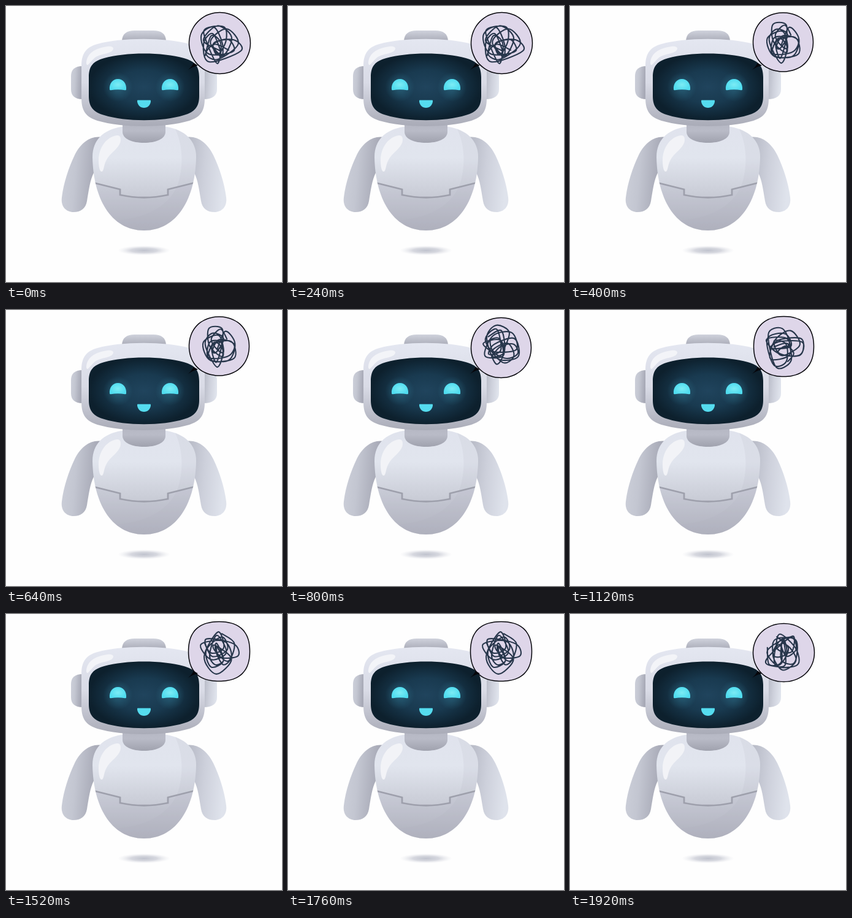
These frames come from a looping animation (450 by 450 pixels, 2240 ms). An HTML page:

```html
<!DOCTYPE html>
<html lang="en">
<head>
<meta charset="utf-8">
<title>Thinking robot</title>
<style>
  html, body { margin: 0; width: 100%; height: 100%; overflow: hidden; background: #fefefe; }
  svg { display: block; width: 100%; height: 100%; }
  .thought { visibility: hidden; animation: long 2240ms step-end infinite; animation-delay: calc(var(--at) * 1ms - 2240ms); }
  .thought.brief { animation-name: brief; }
  .outline { fill: #ded6e9; stroke: #05050a; stroke-width: 1.5; }
  .tail { fill: #05050a; }
  .scribble { fill: none; stroke: #27364b; stroke-width: 2.1; stroke-linecap: round; }
  @keyframes long { 0% { visibility: visible; } 17.8571%, 100% { visibility: hidden; } }
  @keyframes brief { 0% { visibility: visible; } 14.2857%, 100% { visibility: hidden; } }
</style>
</head>
<body>
<svg viewBox="0 0 450 450">
  <defs>
    <linearGradient id="shell" x2="0" y2="1">
      <stop offset="0" stop-color="#e4e7f1"/><stop offset=".5" stop-color="#d9dbe6"/><stop offset="1" stop-color="#a9abb7"/>
    </linearGradient>
    <linearGradient id="torso" x2="0" y2="1">
      <stop offset="0" stop-color="#e0e3ed"/><stop offset=".3" stop-color="#e1e5ee"/><stop offset=".6" stop-color="#cdd0da"/><stop offset="1" stop-color="#b2b4bf"/>
    </linearGradient>
    <linearGradient id="knob" x2="0" y2="1">
      <stop offset="0" stop-color="#cfd2dc"/><stop offset="1" stop-color="#a8aab6"/>
    </linearGradient>
    <linearGradient id="neck" x2="0" y2="1">
      <stop offset="0" stop-color="#b5b7c3"/><stop offset=".4" stop-color="#b9bbc7"/><stop offset="1" stop-color="#a0a2ae"/>
    </linearGradient>
    <linearGradient id="leftSide" x2="1" y2=".15">
      <stop offset="0" stop-color="#cdd0da"/><stop offset=".4" stop-color="#c3c6d1"/><stop offset=".9" stop-color="#a7a9b6"/>
    </linearGradient>
    <linearGradient id="rightSide" x2="1" y2=".15">
      <stop offset="0" stop-color="#b4b7c3"/><stop offset=".5" stop-color="#cdd0db"/><stop offset="1" stop-color="#dfe3ec"/>
    </linearGradient>
    <radialGradient id="screen">
      <stop offset="0" stop-color="#20445d"/><stop offset=".5" stop-color="#193a50"/><stop offset="1" stop-color="#0d202d"/>
    </radialGradient>
    <radialGradient id="glow">
      <stop offset="0" stop-color="#3a91ad" stop-opacity=".4"/><stop offset="1" stop-color="#3a91ad" stop-opacity="0"/>
    </radialGradient>
    <radialGradient id="light">
      <stop offset="0" stop-color="#7cecf5"/><stop offset="1" stop-color="#50dcef"/>
    </radialGradient>
    <radialGradient id="shadow">
      <stop offset="0" stop-color="#bfc2cd"/><stop offset=".5" stop-color="#ccced7" stop-opacity=".8"/><stop offset="1" stop-color="#e6e7ed" stop-opacity="0"/>
    </radialGradient>
    <clipPath id="inTorso"><use href="#torsoShape"/></clipPath>
    <g id="eye">
      <circle r="24" fill="url(#glow)"/>
      <path d="M-13.5 4C-14.5-6-8-13 0-13S14.5-6 13.5 4Q13.5 5.5 11.5 5.300Q0 3-11.5 5.300Q-13.5 5.5-13.5 4Z" fill="url(#light)"/>
    </g>
  </defs>

  <ellipse cx="225" cy="398.500" rx="43" ry="8" fill="url(#shadow)"/>

  <path d="M156 214C138 211 122 223 112 243C102 264 94 288 91 312C89 327 98 336 110 336C122 336 130 330 132 318C135 300 137 284 143 272Z" fill="url(#leftSide)"/>
  <path d="M294 214C312 211 328 223 338 243C348 264 356 288 359 312C361 327 352 336 340 336C328 336 320 330 318 318C315 300 313 284 307 272Z" fill="url(#rightSide)"/>

  <path id="torsoShape" d="M188 197C158 202 141 219 141 246C142 312 170 366 225 366S309 312 310 246C310 219 291 202 262 197Z" fill="url(#torso)"/>
  <g clip-path="url(#inTorso)">
    <path d="M273 195C286 218 290 249 283 281C275 319 237 345 180 350V370H315V195Z" fill="#a6a9b8" opacity=".13"/>
    <path d="M140 288L186 299V308Q225 316.500 264 308V299L310 288V370H140Z" fill="#a2a4b2" opacity=".16"/>
    <path d="M144 288.500L186 299V308Q225 316.500 264 308V299L306 288.500" fill="none" stroke="#9ea0ac" stroke-width="2.800"/>
  </g>
  <path d="M180 211C164 214 151 230 151 252C151 263 153 270 156 270C160 270 159 258 165 249C172 238 187 230 187 218C187 212 184 210.500 180 211Z" fill="#f2f3f7"/>
  <path d="M190 190H260V205C260 217 244 223 225 223S190 217 190 205Z" fill="url(#neck)"/>

  <path d="M125 98C112 98 106 104 106 114V136C106 146 112 152 125 152Z" fill="url(#leftSide)"/>
  <path d="M322 98C337 98 344 104 344 114V136C344 146 337 152 322 152Z" fill="url(#rightSide)"/>
  <path d="M189 58C189 45 197 40 210 40H240C253 40 261 45 261 58Z" fill="url(#knob)"/>
  <path d="M123 98C123 77 131 67 149 62C187 51 261 51 299 62C317 67 324 77 324 98V150C324 172 317 181 299 187C259 199 190 199 149 187C131 181 123 172 123 150Z" fill="url(#shell)"/>
  <path d="M131 94C131 79 143 69 165 66C173 65 177 68 174 72C169 79 152 77 143 86C137 92 134 97 132 96Z" fill="#f3f4f8"/>
  <path d="M135 116C135 98 142 90 160 85C195 75 255 75 290 85C308 90 315 98 315 116V147C315 164 308 173 290 178C255 189 195 189 160 178C142 173 135 164 135 147Z" fill="url(#screen)"/>
  <use href="#eye" x="182.500" y="132"/>
  <use href="#eye" x="267.500" y="132"/>
  <path d="M214.500 153.500H235.500Q236.300 153.500 236 156C235 162 231 166 225 166S215 162 214 156Q213.700 153.500 214.500 153.500Z" fill="#55dcef"/>
</svg>
<script>
  // Each thought is a bubble around (x, y); corner pushes its diagonals outwards.
  const thoughts = [
    { at: 0, x: 348.5, y: 60.5, rx: 50, ry: 50, corner: 0 },
    { at: 400, x: 347.5, y: 59, rx: 49, ry: 48, corner: 0.02 },
    { at: 800, x: 347.5, y: 61.5, rx: 49, ry: 49, corner: 0.01, brief: true },
    { at: 1120, x: 348.5, y: 59.5, rx: 49, ry: 49, corner: 0.05 },
    { at: 1520, x: 347.5, y: 61, rx: 50, ry: 48.5, corner: 0.06 },
    { at: 1920, x: 348.5, y: 63, rx: 50, ry: 47.5, corner: 0.01, brief: true }
  ];
  const svg = document.querySelector('svg');

  function add(parent, tag, attributes) {
    const node = document.createElementNS(svg.namespaceURI, tag);
    for (const [name, value] of Object.entries(attributes)) node.setAttribute(name, value);
    return parent.appendChild(node);
  }

  function seededRandom(seed) {
    return () => {
      seed = (seed * 16807) % 2147483647;
      return seed / 2147483647;
    };
  }

  // Smooth curve through all points (Catmull-Rom as cubic Beziers).
  function smooth(points) {
    const at = i => points[Math.max(0, Math.min(points.length - 1, i))];
    const handle = (i, dir) => at(i).map((v, k) => v + dir * (at(i + 1)[k] - at(i - 1)[k]) / 6);
    return points.slice(1).reduce(
      (d, point, i) => d + 'C' + [handle(i, 1), handle(i + 1, -1), point].join(' '), 'M' + points[0]);
  }

  function outline({ x, y, rx, ry, corner }) {
    const points = Array.from({ length: 49 }, (_, i) => {
      const angle = i * Math.PI / 24;
      const reach = 1 + corner * (1 - Math.cos(4 * angle)) / 2;
      return [x + rx * reach * Math.cos(angle), y + ry * reach * Math.sin(angle)];
    });
    return smooth(points) + 'Z';
  }

  // Loops of changing size around a centre that wanders inside the bubble.
  function scribble({ x, y }, random) {
    const points = [];
    let angle = random() * 2 * Math.PI;
    let drift = random() * 2 * Math.PI;
    for (let loop = 0; loop < 9; loop++) {
      const offset = 8 + 8 * random();
      const [width, height] = [12 + 13 * random(), 12 + 13 * random()];
      drift += 1.8 + random();
      for (let step = 0; step < 4; step++) {
        angle += 1.3 + 0.5 * random();
        points.push([
          x - 1 + offset * Math.cos(drift) + width * Math.cos(angle),
          y + offset * Math.sin(drift) + height * Math.sin(angle)
        ]);
      }
    }
    return smooth(points);
  }

  thoughts.forEach((thought, i) => {
    const group = add(svg, 'g', { class: thought.brief ? 'thought brief' : 'thought', style: `--at: ${thought.at}` });
    add(group, 'path', { class: 'outline', d: outline(thought) });
    add(group, 'path', { class: 'tail', d: 'M306 93Q303 99 297 104Q304 99 313 97Z' });
    add(group, 'path', { class: 'scribble', d: scribble(thought, seededRandom(7919 * (i + 3))) });
  });
</script>
</body>
</html>
```
